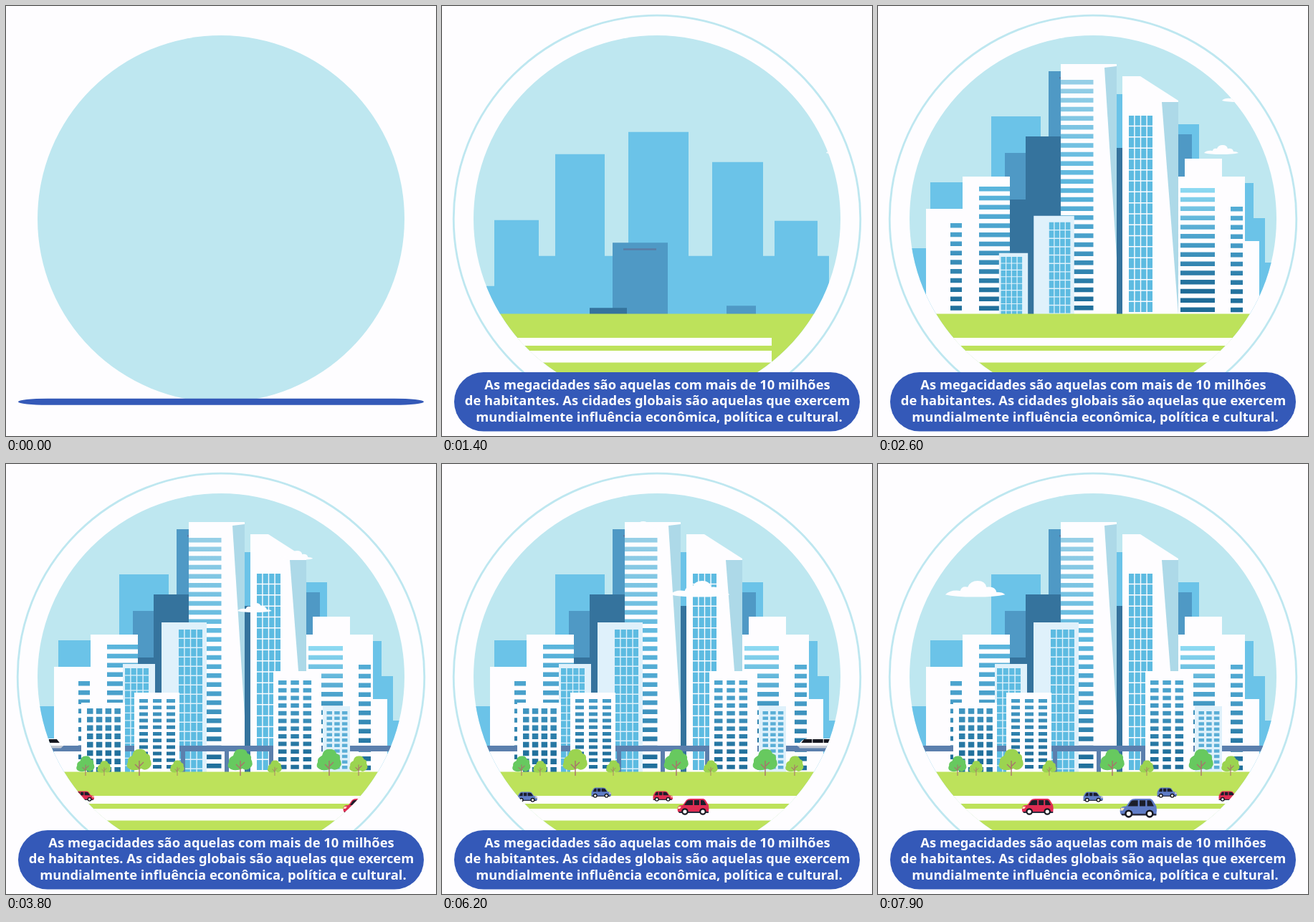
An HTML page for the animation above (8 s loop, 600 by 600 pixels).

```html
<!DOCTYPE html>
<html lang="pt">
<head>
<meta charset="utf-8">
<style>
  html, body { margin: 0; width: 100%; height: 100%; overflow: hidden; background: #fefdff; }
  svg { display: block; width: 100vw; height: 100vh; }
  text { font: 700 18.35px "Noto Sans", "Open Sans", sans-serif; fill: #fff; text-anchor: middle; }
</style>
</head>
<body>
<svg viewBox="0 0 600 600">
  <defs>
    <clipPath id="disc"><circle cx="300" cy="297" r="256"/></clipPath>
    <clipPath id="horizon"><rect width="600" height="430"/></clipPath>
    <linearGradient id="tall" gradientUnits="userSpaceOnUse" x1="0" y1="100" x2="0" y2="430">
      <stop offset="0" stop-color="#98d0e7"/><stop offset=".45" stop-color="#5cb7de"/>
      <stop offset=".7" stop-color="#469dc8"/><stop offset=".92" stop-color="#21709c"/>
    </linearGradient>
    <linearGradient id="low" gradientUnits="userSpaceOnUse" x1="0" y1="252" x2="0" y2="430">
      <stop offset="0" stop-color="#90dcf4"/><stop offset=".4" stop-color="#4ba2cc"/>
      <stop offset=".8" stop-color="#1f6c98"/>
    </linearGradient>
    <path id="cloud" fill="#fefdff" d="M0 11Q4 7 12 8Q13 4 18 5Q20 0 26 0Q32 0 33 5Q40 4 41 9Q46 9 48 11Q40 13 24 13Q8 13 0 11Z"/>
    <g id="car">
      <path d="M1 12Q2 9 8 9L13 2Q15 0 19 0H36Q39 0 41 4L44 9Q45 13 44 19H2Q0 17 1 12Z"/>
      <path fill="#1b1e2b" d="M10 9L14 3Q15 2 18 2H22V9ZM24 2H31V9H24ZM33 2H36Q38 2 39 5L41 9H33Z"/>
      <path fill="#2a2c40" d="M2 18H44V20H3Z"/>
      <path fill="#ffe7c4" d="M2 11H6L4 14H1Z"/>
      <g fill="#fff" stroke="#16171f" stroke-width="2.2">
        <circle cx="11" cy="18" r="3.7"/><circle cx="36" cy="18" r="3.7"/>
      </g>
    </g>
    <g id="tree">
      <path d="M-13 -9Q-20 -12 -16 -19Q-17 -25 -10 -28Q-8 -38 1 -37Q8 -38 10 -31Q16 -30 15 -23Q19 -16 14 -11Q8 -6 3 -10Q-6 -6 -13 -9Z"/>
      <path fill="none" stroke="#a9716b" stroke-width="1.4" d="M0 0V-21M0 -10L-6 -16M0 -13L6 -19"/>
    </g>
  </defs>

  <circle cx="300" cy="297" r="256" fill="#bee7f0"/>
  <circle id="ring" cx="300" cy="297" fill="none" stroke="#bee7f0" stroke-width="2.8"/>

  <g clip-path="url(#disc)">
    <g clip-path="url(#horizon)">
      <path id="far" fill="#6bc3e8" d="M40 430V338H73V246H135V296H158V154H227V296H260V123H344V296H377V165H448V296H464V247H524V296H540V358H560V430Z"/>
      <g id="mid">
        <path fill="#4f99c5" d="M177 430V205H238V91H315V430ZM397 430V179H438V430Z"/>
        <path fill="#5b7ca5" d="M253 99H299V101.500H253Z"/>
        <path fill="#35739d" d="M168 430V270H206V182H258V430ZM308 430V198H372V430Z"/>
      </g>
      <g id="towers" fill="#fefdff"></g>
      <g id="pair" fill="#dff1fb"></g>
      <path id="rail" fill="#5b7fad" d="M40 393H560V401H373V430H367V401H311V430H305V401H250V430H244V401H40Z"/>
      <g id="train"></g>
      <g id="front" fill="#fefdff"></g>
    </g>
    <path id="grass" fill="#bde25b" d="M81 429.500H519A256 256 0 0 1 81 429.500Z"/>
    <path id="roads" fill="#fefdff" d="M40 463H560V474H40ZM40 481H560V497.500H40Z"/>
    <g id="trees"></g>
    <g id="movers"></g>
  </g>

  <rect id="panel" x="17" y="511" width="566" height="82.500" rx="41" fill="#3459b8"/>
  <g id="lines">
    <text x="300.500" y="534.500">As megacidades são aquelas com mais de 10 milhões</text>
    <text x="300.500" y="557">de habitantes. As cidades globais são aquelas que exercem</text>
    <text x="303" y="580">mundialmente influência econômica, política e cultural.</text>
  </g>
</svg>

<script>
const $ = id => document.getElementById(id);
const clamp = u => Math.max(0, Math.min(1, u));
const easeOut = (t, start, length) => 1 - (1 - clamp((t - start) / length)) ** 3;
const move = (el, value) => el.setAttribute('transform', value);
const showFrom = (el, t, start) => el.setAttribute('visibility', t > start ? 'visible' : 'hidden');

const shape = (d, fill) => `<path d="${d}"${fill ? ` fill="${fill}"` : ''}/>`;

// Grid of window panes: origin, pane size, pitch and count
function panes(x, y, w, h, dx, dy, cols, rows, fill = 'url(#tall)') {
  let d = '';
  for (let r = 0; r < rows; r++)
    for (let c = 0; c < cols; c++)
      d += `M${x + c * dx} ${(y + r * dy).toFixed(2)}h${w}v${h}h${-w}z`;
  return shape(d, fill);
}

const facet = '#add9e8', glass = '#5dbbe1';
const towers = [
  shape('M67 430V283H118V238H184V430Z') +
    panes(101, 303, 16, 6.5, 0, 12.8, 1, 10) + panes(141, 252, 43, 6.5, 0, 12.8, 1, 14),
  shape('M255 430V81H333V430Z') + shape('M316 86L333 84V352Z', facet) +
    panes(255, 103, 45.5, 6.5, 0, 12.6, 1, 26),
  shape('M341 430V98H366L419 132V430Z') + shape('M396 134H419V430Z', facet) +
    panes(350, 153, 7.2, 13.8, 8.6, 15.3, 4, 18, glass),
  shape('M419 430V238H428V213H480V238H512V328H532V430Z') +
    panes(422, 254, 48, 6.5, 0, 12.8, 1, 14, 'url(#low)') +
    panes(492, 280, 17, 6.5, 0, 12.8, 1, 12)
];
const fronts = [
  shape('M105 430V333H166V430Z') + panes(113, 341, 8.5, 7.8, 12.8, 11.7, 4, 8),
  shape('M179 430V319H242V430Z') + panes(186, 328, 12, 5, 19, 9.2, 3, 11),
  shape('M373 430V289H440V430Z') + panes(380, 302, 11.5, 6, 17.3, 10.7, 3, 12),
  shape('M442 430V338H480V430Z', '#dff1fb') + panes(447.5, 345, 7.5, 4.5, 10.7, 7.6, 3, 11, '#5aaed6')
];
const group = parts => parts.map(p => `<g>${p}</g>`).join('');
$('towers').innerHTML = group(towers);
$('front').innerHTML = group(fronts);
$('pair').innerHTML =
  shape('M163 430V279H208V430Z') + panes(166, 285, 7.2, 9.3, 8.6, 10.5, 4, 14, glass) +
  shape('M217 430V221H280V430Z') + panes(241, 231, 7.2, 11.4, 8.6, 13, 4, 16, glass);

$('train').innerHTML =
  shape('M0 11Q4 1 14 0H136Q146 1 150 11Z', '#fefdff') +
  shape('M5 6L9 1H20V6ZM130 1H141L145 6H130Z', '#16171f') +
  panes(21, 1, 14.5, 5, 15.5, 0, 7, 1, '#16171f') +
  shape('M0 10H150L147 13.5H3Z', '#c3c9d2');

const dark = '#67c95f', light = '#9bd450';
const trees = [[111, .74, dark], [137, .56, light], [186, 1, light], [239, .58, light],
  [327, 1, dark], [375, .58, light], [451, 1, dark], [492, .74, light]];
$('trees').innerHTML = trees.map(t => `<use href="#tree" fill="${t[2]}"/>`).join('');

const red = '#df2c52', blue = '#5f7cc6';
// Each mover passes x at second `at` with speed v and acceleration a
const car = (x, y, at, v, a, scale, fill) => ({ x, y, at, v, a, scale, fill, kind: 'car', flip: v > 0 });
const cloud = (x, y, at, v, a, scale = 1) => ({ x, y, at, v, a, scale, kind: 'cloud' });
const movers = [
  car(208, 451.5, 6.2, 96.7, 11.5, .63, blue),
  car(294, 456.5, 6.2, 96.7, 11.5, .63, red),
  car(105, 457.5, 6.2, 96.7, 11.5, .63, blue),
  car(328, 467, 6.2, -68.5, -7.8, 1, red),
  car(337, 467, 7.9, -95, -8, 1.17, blue),
  cloud(455, 194, 2.6, -88.7, -35.6),
  cloud(480, 121, 2.6, -62, -35),
  cloud(255, 80, 6.2, -110, -15),
  cloud(318, 163, 6.2, -119, -15, 1.74)
];
$('movers').innerHTML = movers.map(m => `<use href="#${m.kind}" fill="${m.fill || ''}"/>`).join('');

function rise(el, t, start, length, depth) {
  showFrom(el, t, start);
  move(el, `translate(0 ${depth * (1 - easeOut(t, start, length))})`);
}

function draw(t) {
  const ringIn = easeOut(t, 200, 1000);
  $('ring').setAttribute('r', 283.8 + 60 * (1 - ringIn));
  $('ring').setAttribute('opacity', clamp((t - 200) / 200));

  const open = .11 + .89 * easeOut(t, 50, 550);
  move($('panel'), `translate(0 552.2) scale(1 ${open}) translate(0 -552.2)`);
  [...$('lines').children].forEach((line, i) =>
    line.setAttribute('opacity', clamp((t - 450 - 90 * i) / 250)));

  move($('grass'), `translate(300 520) scale(${easeOut(t, 250, 950)}) translate(-300 -520)`);
  move($('roads'), `translate(${-540 * (1 - easeOut(t, 1100, 700))} 0)`);

  rise($('far'), t, 1000, 900, 310);
  rise($('mid'), t, 1300, 900, 342);
  [...$('towers').children].forEach((el, i) => rise(el, t, 2000 + 20 * i, 520, 352));

  const p = easeOut(t, 2350, 750);
  showFrom($('pair'), t, 2350);
  move($('pair'), `translate(219.5 ${325 + 207 * (1 - p)}) scale(${.65 + .35 * p}) translate(-219.5 -325)`);

  rise($('rail'), t, 2750, 500, 40);
  [...$('front').children].forEach((el, i) => rise(el, t, 2700 + 50 * i, 650, 145));
  [...$('trees').children].forEach((el, i) =>
    move(el, `translate(${trees[i][0]} 435) scale(${trees[i][1] * easeOut(t, 3000 + 30 * i, 400)})`));

  move($('train'), `translate(${496 + 236 * (t / 1000 - 6.2)} 383)`);

  [...$('movers').children].forEach((el, i) => {
    const m = movers[i], d = t / 1000 - m.at;
    const x = m.x + m.v * d + m.a * d * d / 2;
    move(el, m.flip
      ? `translate(${x + 45 * m.scale} ${m.y}) scale(${-m.scale} ${m.scale})`
      : `translate(${x} ${m.y}) scale(${m.scale})`);
  });
}

const begin = performance.now();
function tick() {
  draw((performance.now() - begin) % 8000);
  requestAnimationFrame(tick);
}
tick();
</script>
</body>
</html>
```
